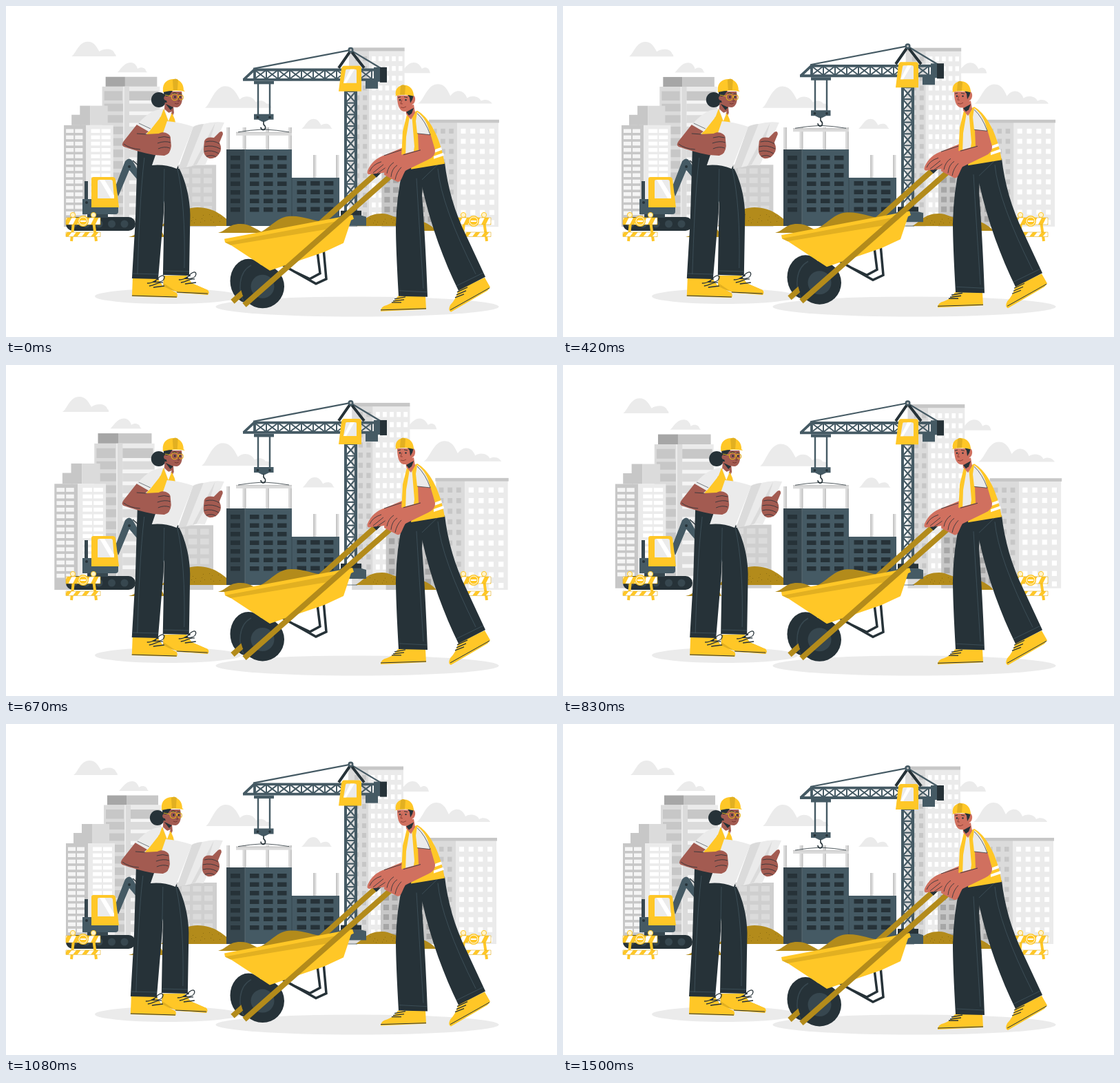
Animation, 800 px wide and 480 px high, one loop 1.54 s. Source, as an HTML page with a canvas:

```html
<!DOCTYPE html>
<html lang="en">
<head>
<meta charset="utf-8">
<title>Construction site</title>
<style>
html, body { margin: 0; width: 100%; height: 100%; overflow: hidden; background: #fff; }
canvas { display: block; width: 800px; height: 480px; }
</style>
</head>
<body>
<canvas id="stage" width="800" height="480"></canvas>
<script>
const ctx = document.getElementById('stage').getContext('2d');

const YELLOW = '#ffc727', AMBER = '#e2b021', OCHRE = '#b38b1b';
const INK = '#263238', STEEL = '#37474f', SLATE = '#455a64';
const G1 = '#f5f5f5', G2 = '#ebebeb', G3 = '#dbdbdb', G4 = '#c7c7c7', G5 = '#a6a6a6';
const SKIN_A = '#a35b51', SKIN_B = '#d0705f';

// Drawing helpers
const fill = (color, d) => { ctx.fillStyle = color; ctx.fill(new Path2D(d)); };
const line = (color, width, d) => {
  ctx.strokeStyle = color;
  ctx.lineWidth = width;
  ctx.stroke(new Path2D(d));
};
const rect = (color, x1, y1, x2, y2) => {
  ctx.fillStyle = color;
  ctx.fillRect(x1, y1, x2 - x1, y2 - y1);
};
const oval = (color, x, y, rx, ry = rx) => {
  ctx.fillStyle = color;
  ctx.beginPath();
  ctx.ellipse(x, y, rx, ry, 0, 0, Math.PI * 2);
  ctx.fill();
};
const ring = (color, width, x, y, r) => {
  ctx.strokeStyle = color;
  ctx.lineWidth = width;
  ctx.beginPath();
  ctx.arc(x, y, r, 0, Math.PI * 2);
  ctx.stroke();
};
const grid = (color, x, y, cols, rows, dx, dy, w, h) => {
  for (let r = 0; r < rows; r++)
    for (let c = 0; c < cols; c++)
      rect(color, x + c * dx, y + r * dy, x + c * dx + w, y + r * dy + h);
};
const moved = (dx, dy, draw) => {
  ctx.save();
  ctx.translate(dx, dy);
  draw();
  ctx.restore();
};

// Motion: keys are [percent, value] pairs with linear steps between them
const tween = (p, keys) => {
  const i = Math.max(1, keys.findIndex(k => k[0] >= p));
  const [a, u] = keys[i - 1], [b, v] = keys[i];
  return u + (v - u) * (p - a) / (b - a);
};
const PULSE = [[0, 1], [10, 1.1], [30, 1], [40, 1], [50, 1.1], [60, 1], [100, 1]];
const LIFT = [[0, 0], [50, -10], [100, 0]];
const SHAKE = [[0, 0], [10, -1], [20, 2], [30, -4], [40, 4], [50, -4],
  [60, 4], [70, -4], [80, 2], [90, -1], [100, 0]];

function clouds() {
  fill(G2, `M98 74C104 71 108 53 121 53C131 53 134 61 138 67C143 63 157 61 160 70Q162 71 162 74Z
    M164 97C168 94 173 83 183 83C189 83 192 88 193 92C198 88 205 91 205 95L207 97Z
    M290 148C297 145 303 117 319 117C331 117 336 129 340 136C347 129 359 131 363 140C368 136 376 138 378 142C383 141 385 145 386 148Z
    M429 178C434 175 437 164 446 164C452 164 455 169 457 173C463 169 470 171 471 176L473 178Z
    M571 98C576 94 581 83 590 83C597 83 600 88 602 92C607 88 612 91 613 95L614 98Z
    M596 142C605 138 609 114 625 114C636 114 640 125 643 131C650 121 662 121 667 134C674 129 685 132 687 138C694 134 701 138 703 142Z`);
}

function city() {
  clouds();
  // Tall block on the left
  rect(G5, 147, 103.5, 175, 117.5);
  rect(G4, 175, 103.5, 221, 117.5);
  rect(G3, 142, 117.5, 180, 319);
  rect(G2, 172, 117.5, 225, 319);
  rect(G3, 174, 117.5, 181, 319);
  grid(G1, 181, 137, 1, 11, 0, 16.5, 44, 5);
  grid(G3, 181, 142, 1, 11, 0, 16.5, 44, 11);
  grid(G4, 145, 142, 1, 11, 0, 16.5, 27, 11);
  rect(G4, 145, 124, 171, 137.5);
  rect(G4, 181, 124, 223, 137.5);
  // Stepped block
  rect(G4, 98, 158, 112, 173);
  rect(G4, 110, 145, 125, 173);
  rect(G3, 125, 145, 150, 173);
  rect(G4, 87, 173, 119, 319);
  rect(G2, 119, 173, 158, 319);
  grid(G1, 90, 178.5, 2, 14, 13, 9.1, 11, 5.5);
  grid('#fff', 126, 178.5, 2, 14, 15, 9.1, 13, 5.5);
  // Low block behind the plans
  rect('#cfcfcf', 200, 230, 306, 319);
  grid(G3, 222, 235, 5, 6, 16.5, 13.5, 12, 8);
  // Right tower
  rect(G3, 497, 65, 526, 319);
  rect(G2, 526, 65, 577, 319);
  rect(G4, 496, 61.5, 577, 66.5);
  grid(G4, 506, 74, 2, 17, 11, 14, 6, 7);
  grid('#fff', 530, 74, 5, 17, 9.6, 14, 5.5, 7);
  // Far right block
  rect(G3, 613, 169, 653, 319);
  rect(G2, 653, 169, 712, 319);
  rect(G4, 612, 165, 713, 169.5);
  grid(G4, 617, 178, 3, 10, 12, 14.6, 6.5, 7);
  grid('#fff', 658, 178, 4, 10, 13.7, 14.6, 7, 7);
  rect(G4, 544, 235, 625, 319);
  grid(G5, 548, 248, 6, 5, 12.5, 14, 8, 8);
}

function darkBuilding() {
  for (const x of [320, 343.5, 377, 410]) {
    rect(G3, x, 176, x + 5, 208);
    rect(G4, x + 3, 176, x + 5, 208);
  }
  for (const x of [446, 479]) {
    rect(G3, x, 216, x + 4.5, 249);
    rect(G4, x, 216, x + 2, 249);
  }
  rect(STEEL, 320, 208, 347, 319);
  rect(SLATE, 347, 208, 415, 319);
  rect(SLATE, 415, 249, 484, 319);
  rect(STEEL, 414.5, 249, 415.5, 319);
  grid(INK, 326, 217, 1, 7, 0, 12.5, 14, 6.5);
  grid(INK, 354, 217, 3, 7, 20, 12.5, 13.5, 6.5);
  grid(INK, 422.5, 254, 3, 4, 19.7, 12.5, 13.5, 6.5);
  line('#607078', 0.8, 'M347 208V319');
}

function beam() {
  rect(G3, 334, 183, 415, 188);
  rect(G4, 334, 183, 415, 184.3);
  line(INK, 0.8, 'M337 183Q354 180 374 179Q394 180 411 183');
}

function crane() {
  // Mast
  rect(SLATE, 491, 118, 495, 300);
  rect(SLATE, 506, 118, 510, 300);
  for (let y = 124; y < 292; y += 16.8)
    line(SLATE, 2.2, `M493 ${y}L508 ${y + 16.8}M508 ${y}L493 ${y + 16.8}M493 ${y}H508`);
  fill(SLATE, 'M486 304H516L523 306V319H478V310Z');
  rect(INK, 486, 297, 516, 304);
  // Boom
  line(SLATE, 2.2, 'M359 91L500 64L545 91');
  line(SLATE, 3.8, 'M361 92.7H540M344 107H540M361 92L345 107M361 92V107');
  for (let x = 361; x < 528; x += 17)
    line(SLATE, 2, `M${x} 93L${x + 17} 106M${x + 17} 93L${x} 106M${x + 17} 93V106`);
  rect(SLATE, 534, 89, 544, 110);
  rect(SLATE, 522, 107, 540, 120);
  rect(INK, 543, 89, 553, 111);
  line(INK, 4, 'M499 67L483 90M502 67L520 90');
  oval(SLATE, 500.5, 64, 4);
  oval(G4, 500.5, 64, 1.5);
  // Cab
  fill(YELLOW, 'M491 87H512Q516 87 516 91V124H483L487 91Q488 87 491 87Z');
  fill(G2, 'M495 92H507Q509 92 509 94V112H490L493 94Q493 92 495 92Z');
  fill('#fff', 'M500 92H506L494 112H490Z');
  // Trolley, cables and hook
  rect(SLATE, 360, 109, 389, 113.5);
  line(SLATE, 2.4, 'M366 112V159M383 112V159');
  fill(SLATE, 'M360 157H388.5V165H382L376 168H372L366 165H360Z');
  oval(INK, 365.5, 161.5, 1.8);
  oval(INK, 383, 161.5, 1.8);
  line(INK, 1.6, 'M374 167V172C378 175 377 180 373 180Q370 179 370 176');
}

function mounds() {
  fill(OCHRE, 'M178 335C194 332 194 320 212 317Q222 316 230 335Z');
  fill(OCHRE, 'M225 319C241 306 256 292 278 292C304 292 316 306 333 319Z');
  fill(OCHRE, 'M507 319C517 315 523 301 546 301C558 301 563 308 578 308C602 309 615 315 625 326H594L570 319Z');
  for (let i = 0; i < 16; i++) {
    const x = i * 37 % 50, y = i * 11 % 13;
    rect('#8d6d12', 264 + x, 302 + y, 265 + x, 303 + y);
    rect('#8d6d12', 528 + x, 308 + y * .7, 529 + x, 309 + y * .7);
  }
}

function excavator() {
  fill(SLATE, 'M158 264L173 225Q179 218 184 225L196 246V258L179 238L163 276Z');
  line(INK, 1.2, 'M184 224L194 233');
  oval(INK, 179, 233, 2);
  ctx.fillStyle = INK;
  ctx.beginPath();
  ctx.roundRect(87, 306, 101, 20, 10);
  ctx.fill();
  for (let x = 98; x < 185; x += 18.5) oval(STEEL, x, 316, 5.5);
  rect(STEEL, 114, 254, 119, 281);
  rect(STEEL, 118, 300, 148, 307);
  fill(SLATE, 'M111 280H125V291H163V298Q163 302 159 302H111Z');
  fill(YELLOW, 'M127 248H155Q158 248 159 251L164 292H124V251Q124 248 127 248Z');
  fill(G2, 'M135 252H152Q155 252 155 255L157 279H133V254Q133 252 135 252Z');
  fill('#fff', 'M136 252H143L157 275V279H152Z');
  oval(INK, 117, 285, 2);
}

function barrier() {
  line(YELLOW, 4, 'M99 305L95 341M126 305L131 341');
  for (const [y, h] of [[307, 10], [328, 6.5]]) {
    rect('#fff', 87, y, 137, y + h);
    ctx.save();
    ctx.beginPath();
    ctx.rect(87, y, 50, h);
    ctx.clip();
    for (let x = 84; x < 140; x += 13)
      fill(YELLOW, `M${x} ${y + h}L${x + 5} ${y}h6.5l-5 ${h}Z`);
    ctx.restore();
    line(AMBER, 0.6, `M87 ${y}h50v${h}h-50Z`);
  }
  for (const x of [97, 127]) {
    oval('#fff3cc', x, 303, 3.6);
    ring(YELLOW, 1, x, 303, 3.6);
  }
  oval(YELLOW, 112, 312, 8);
  ring('#fff', 1, 112, 312, 6);
  rect('#fff', 108, 311, 116, 313);
}

function womanLegs() {
  // Boots
  fill(AMBER, 'M229 391H262L270 402L293 412Q296 416 293 419L255 416L228 409Z');
  fill(YELLOW, 'M232 391H262L270 402L293 412Q296 415 293 418L250 416L229 402Z');
  fill(YELLOW, 'M184 395H220L228 406L248 416Q250 420 248 423L183 421Z');
  line(INK, 1, 'M183 420L248 422M248 415L293 417');
  for (const [x, y] of [[0, 0], [46, -5]])
    moved(x, y, () => line(INK, 1.3,
      'M205 402C216 402 215 397 222 396M208 406C217 405 220 400 228 401M214 408L230 406M216 401C222 391 230 388 230 394C229 400 221 401 213 400'));
  // Trousers
  fill(INK, 'M212 226L249 231C258 246 267 272 267.5 303L266 391L228 390L230 285Z');
  fill(INK, 'M191 209Q204 207 218 213L231 234L229 300L221 396L183 395L188 310Z');
  line(SLATE, 0.7, 'M201 220C195 270 193 330 191 389M184 388L221 389M229 384L266 385M249 236Q261 290 259 380M230 236L229 286');
}

function womanHead() {
  oval(INK, 222, 136, 11);
  fill(SKIN_A, 'M231 138L229 160L238 168L244 155L243 144Z');
  fill(INK, 'M229 124H240L236 140H230Z');
  fill(INK, 'M232 142L243 147L239 151Z');
  fill(SKIN_A, 'M234 124H255C257 132 257 146 248 147C240 147 234 143 233 137C228 137 228 130 233 130Z');
  fill(INK, 'M232 123H242L236 131H232Z');
  ring(AMBER, 1.1, 245, 132, 4.7);
  ring(AMBER, 1.1, 254, 132.5, 3.5);
  line(AMBER, 1, 'M231 129L241 131');
  oval(INK, 245.5, 132, 1.4);
  oval(INK, 253, 132, 1.3);
  line(INK, 1, 'M242 127Q245 125 248 127M251 127L255 128');
  line('#6e332d', 0.9, 'M250 133L252 138L249 138M245 141Q248 143 251 141');
  fill(YELLOW, 'M228 123C227 111 235 106 243 106C253 106 258 113 258 122L260 124Q244 121 228 125Z');
  fill(AMBER, 'M242 107Q246 104 250 107L249 122H243Z');
}

function woman() {
  womanLegs();
  womanHead();
  // Shirt and vest
  fill(G2, 'M227 149L240 157L247 168L232 186H206L190 172C200 162 210 151 227 149Z');
  fill(YELLOW, 'M229 149L225 160L203 187L200 210H222L247 176L245 164L241 155L236 167Z');
  fill('#fff', 'M230 149L236 155L241 153L236 166Z');
  // Plans
  fill(G2, 'M234 167Q251 168 272 175L248 236Q230 229 212 231Z');
  fill(G3, 'M272 175Q280 171 288 171L270 233L250 236Z');
  fill(G2, 'M287 171Q302 167 317 169L289 231Q276 229 262 234Z');
  fill(G3, 'M304 169L296 196L277 230L271 232Z');
  // Arms
  fill(SKIN_A, 'M190 172L207 182L202 186L222 185C229 180 240 186 239 192L240 203Q239 215 230 217L215 216C199 213 183 208 171 204Q167 201 171 196Z');
  fill(G2, 'M220 151L190 172L208 182L223 163Z');
  line(INK, 0.6, 'M193 170L210 178');
  line(INK, 0.8, 'M171 200Q180 207 195 208M221 191Q230 188 238 191M220 199Q231 195 239 198M221 207Q230 203 238 206M190 185L204 186');
  fill(SKIN_A, 'M288 196Q291 189 302 191L310 183Q315 180 315 186L310 198Q315 208 309 215Q304 222 295 221Q287 218 287 208Z');
  line(INK, 0.8, 'M290 197Q302 194 310 200M288 204Q300 201 311 207M288 211Q299 208 309 214M291 218Q300 215 305 219');
}

function barrow() {
  oval(INK, 352, 399, 26.5, 32);
  line(STEEL, 1.5, 'M345 428C337 414 337 386 356 376');
  line(OCHRE, 8, 'M542 239L329 429');
  oval(INK, 372.5, 407, 31.5);
  oval(STEEL, 372.5, 407, 17);
  fill(OCHRE, 'M365 330C383 324 393 305 414 305C438 305 449 315 468 312L440 327Z');
  // Stand
  line(INK, 3.5, 'M402 376L450 403L465 396L461 352M418 385L441 396L456 388L452 356');
  // Tray
  fill(YELLOW, 'M317 338L503 303L505 309L501 311L490 344L462 357L383 384L325 346L318 343Z');
  fill(AMBER, 'M318 343L482 312L472 323L326 347Z');
  line(OCHRE, 8, 'M558 247L346 434');
  line(INK, 8, 'M542 239L535 246');
}

function man() {
  // Shoes
  fill(YELLOW, 'M569 421H609L610 440L544 443Q544 436 553 434Q564 430 569 421Z');
  fill(YELLOW, 'M657 412L695 394L703 408L699 413L646 444Q641 442 645 434Q653 426 657 412Z');
  line(INK, 1, 'M544 441L610 439M645 441L702 409');
  line(INK, 1.3, 'M564 425L580 422M562 428L578 426M560 430L574 430M655 415L670 408M654 419L668 413M652 423L665 418');
  // Trousers
  fill(INK, 'M578 236L637 227C641 262 651 299 669 335L696 393L657 413C636 370 617 320 604 262Z');
  fill(INK, 'M576 238L606 242L604 275Q609 340 612 422L570 421Q566 350 566 320Q567 275 576 238Z');
  line(SLATE, 0.7, 'M571 413L611 415M654 406L693 387M627 236Q632 290 682 389M596 250Q600 320 606 410M604 252L628 229');
  // Far arm
  fill(SKIN_B, 'M575 206L551 216Q532 222 525 239Q523 246 530 244L549 242L577 226Z');
  line(INK, 0.8, 'M528 240Q532 230 545 226M533 242L548 230M539 243L552 234M549 217L574 209');
  // Body
  fill(G2, 'M582 156L597 153L621 178L630 224L577 222L576 200Z');
  fill(YELLOW, 'M582 158L576 182L574 221L580 219L581 190L586 161Z');
  fill(YELLOW, 'M589 156L597 152C612 160 630 186 637 229L588 237L593 204Z');
  fill('#fff', 'M621 209L632 205L633 209L622 213ZM621 218L635 213L636 217L621 222Z');
  // Near arm
  fill(SKIN_B, 'M598 185L616 185L623 209Q624 218 613 223L580 239C575 247 574 257 568 255L558 250L549 245Q549 232 558 222L577 215L599 209Z');
  line(INK, 0.8, 'M553 243Q555 232 563 227M559 248Q560 236 568 231M565 252Q567 241 574 234M577 216L602 209');
  fill(G2, 'M597 154C607 161 613 172 616 187L597 185L595 167Z');
  line(INK, 0.7, 'M597 156Q609 167 616 187L597 185');
  // Head
  fill(SKIN_B, 'M580 148L592 143L594 155L588 165L581 157Z');
  fill(INK, 'M581 154L592 148L589 156L585 159Z');
  fill(SKIN_B, 'M568 130H592C596 133 594 142 590 143C589 149 584 154 577 153C570 151 568 142 568 130Z');
  fill(INK, 'M583 129H592L590 136L587 141L586 133Z');
  oval(INK, 572, 136.5, 1.2);
  oval(INK, 580.5, 136.5, 1.2);
  line(INK, 0.9, 'M569 133L573 132M578 132L583 133');
  line('#873f36', 0.9, 'M575 136L573 142L576 142M573 147Q577 149 581 146');
  fill(YELLOW, 'M566 130C564 120 571 115 578 115C587 115 592 122 592 131Q578 127 564 131Z');
  fill(AMBER, 'M573 116Q576 113 580 116L579 129H572Z');
}

const LOOP = 1540, STEPS = 37, CYCLE = 1500, LEAD = 14;

function render(time) {
  const step = Math.floor((time % LOOP + 3) / LOOP * STEPS) % STEPS;
  const p = Math.min(100, (step * LOOP / STEPS + LEAD) / CYCLE * 100);
  const scale = tween(p, PULSE), lift = tween(p, LIFT), sway = tween(p, SHAKE);

  rect('#fff', 0, 0, 800, 480);
  ctx.save();
  ctx.translate(400, 186);
  ctx.scale(scale, scale);
  ctx.translate(-400, -186);
  city();
  ctx.restore();

  mounds();
  darkBuilding();
  line(SLATE, 0.8, 'M484 319H510');
  moved(0, lift, () => { beam(); crane(); });
  excavator();
  barrier();
  moved(567, 0, barrier);
  oval(G2, 235, 421, 106, 11);
  oval(G2, 510, 436, 205.5, 14.5);
  fill(OCHRE, 'M308 329C320 326 323 316 340 316C355 316 363 324 374 329Z');
  moved(sway, 0, woman);
  moved(0, lift, () => { barrow(); man(); });
}

const start = performance.now();
function tick() {
  render(performance.now() - start);
  requestAnimationFrame(tick);
}
tick();
</script>
</body>
</html>
```
